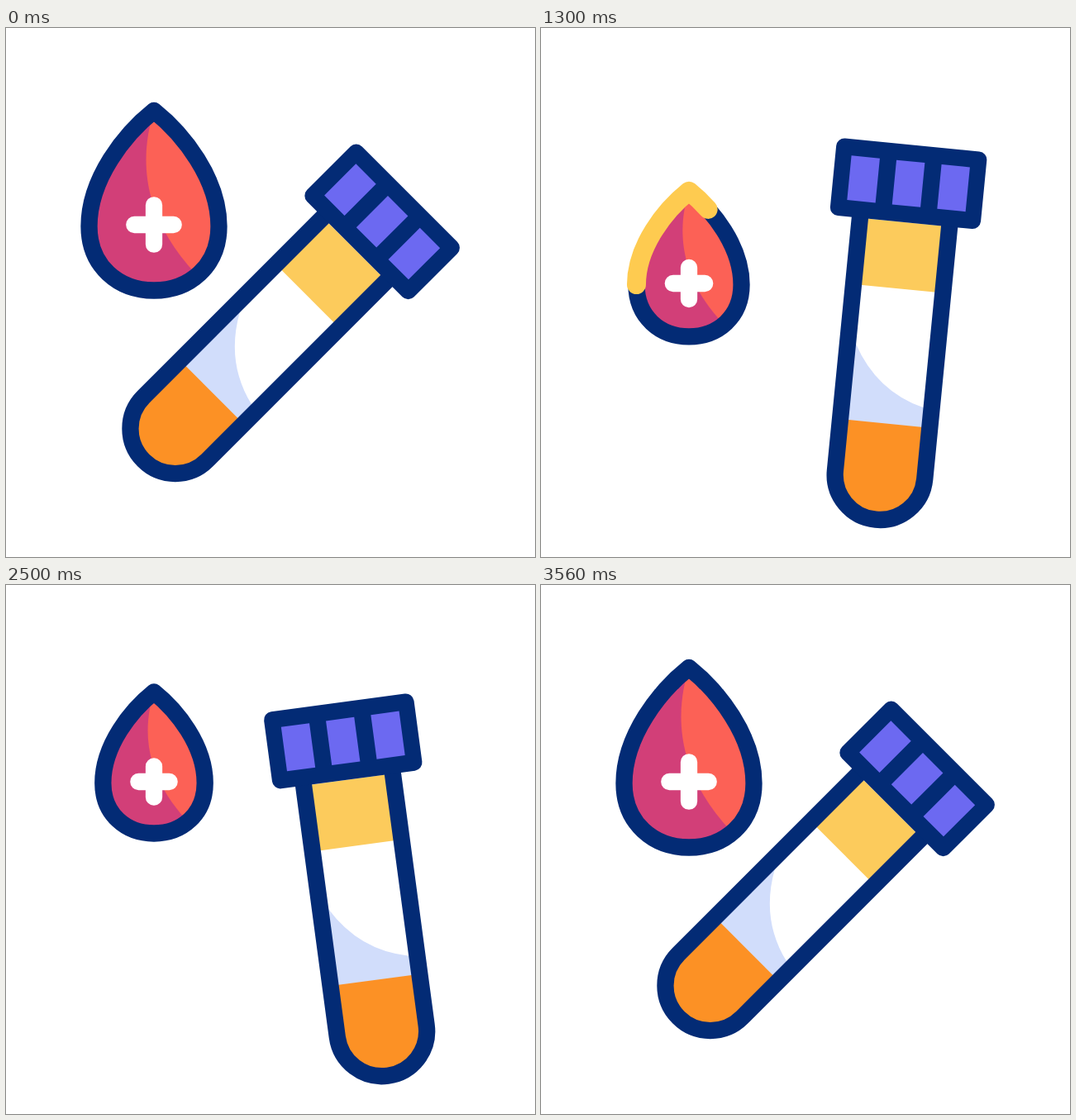
These frames come from a looping animation (640x640 px, 3600 ms). An HTML page:

```html
<!DOCTYPE html>
<html lang="en">
<head>
<meta charset="utf-8">
<title>Blood test</title>
<style>
  html, body { margin: 0; height: 100%; overflow: hidden; background: #fff; }
  svg { display: block; width: 640px; height: 640px; }
</style>
</head>
<body>
<svg viewBox="0 0 640 640" fill="none">
  <defs>
    <path id="outline" pathLength="100" d="M-78.5 2C-78.5 -56 -35 -110 0 -138C35 -110 78.5 -56 78.5 2C78.5 50 43 79.5 0 79.5S-78.5 50 -78.5 2Z"/>
    <clipPath id="inside"><use href="#outline"/></clipPath>
  </defs>

  <g id="drop" stroke-linejoin="round" stroke-linecap="round">
    <use href="#outline" fill="#d23f78"/>
    <path clip-path="url(#inside)" fill="#fc6156" d="M0 -138C-19 -78 -13 -8 51 60H90V-138Z"/>
    <use class="line" data-width="20.3" href="#outline" stroke="#032b75"/>
    <use class="line" data-width="23" id="glow" href="#outline" stroke="#fecb50"/>
    <path class="line" data-width="20.3" stroke="#fff" d="M-23.7 0H23.7M0 -23.7V23.7"/>
  </g>

  <g id="tube">
    <path fill="#fff" d="M-54 -113H54V140H-54Z"/>
    <path fill="#fccb5c" d="M-54 -113H54V-32.5H-54Z"/>
    <path fill="#d1ddfb" d="M-54 25L-44.5 39Q-14 94 44.5 108L54 110V132H-54Z"/>
    <path fill="#fc9125" d="M-54 131.5H54V194A54 54 0 0 1 -54 194Z"/>
    <path stroke="#032b75" stroke-width="20.3" d="M-54.4 -116V194A54.4 54.4 0 0 0 54.4 194V-116"/>
    <rect x="-91.5" y="-207" width="183" height="94" rx="10" fill="#032b75"/>
    <path fill="#6c69f1" d="M-72 -187h34.5v54h-34.5zM-17.3 -187h34.5v54h-34.5zM37.5 -187h34.5v54h-34.5z"/>
  </g>
</svg>
<script>
const LOOP = 3600;
const drop = document.getElementById('drop');
const tube = document.getElementById('tube');
const glow = document.getElementById('glow');
const lines = document.querySelectorAll('.line');

// Keys are [time, value] pairs, eased in and out between neighbours.
const angleKeys = [[558, 45], [1115, -25], [1443, 26], [1811, -25], [2190, 26], [2670, -21], [3190, 45]];
const slideKeys = [[558, 342], [965, 429], [2731, 429], [3440, 254], [3560, 342]];
const scaleKeys = [[220, 1], [2220, 0.66], [2900, 1]];
const fallKeys = [[558, 238], [1115, 309], [1560, 309], [2060, 238]];
const glowEndKeys = [[1100, 0], [1600, 100]];
const glowStartKeys = [[1640, 0], [2190, 100]];

function valueAt(keys, t) {
  const next = keys.findIndex(([time]) => time > t);
  if (next === 0) return keys[0][1];
  if (next < 0) return keys[keys.length - 1][1];
  const [t0, a] = keys[next - 1], [t1, b] = keys[next];
  const k = (t - t0) / (t1 - t0);
  return a + (b - a) * k * k * (3 - 2 * k);
}

function draw() {
  const t = performance.now() % LOOP;

  tube.setAttribute('transform', `translate(${valueAt(slideKeys, t)} 347.5) rotate(${valueAt(angleKeys, t)})`);

  // The drop scales while its lines keep their weight.
  const scale = valueAt(scaleKeys, t);
  drop.setAttribute('transform', `translate(179 ${valueAt(fallKeys, t)}) scale(${scale})`);
  for (const line of lines) line.setAttribute('stroke-width', line.dataset.width / scale);

  const start = valueAt(glowStartKeys, t), end = valueAt(glowEndKeys, t);
  const full = start === 0 && end === 100;
  glow.style.display = end > start ? '' : 'none';
  glow.setAttribute('stroke-dasharray', full ? 'none' : `${end - start} 200`);
  glow.setAttribute('stroke-dashoffset', -start);

  requestAnimationFrame(draw);
}
draw();
</script>
</body>
</html>
```
